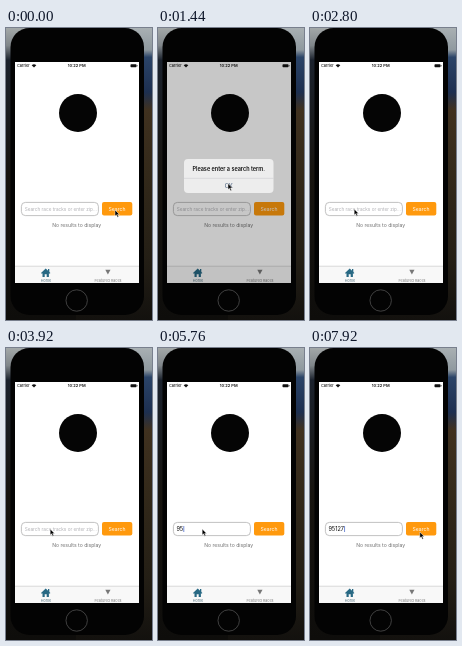
An HTML page for the animation above (8 s loop, 146 px wide and 292 px high).

```html
<!DOCTYPE html>
<html lang="en">
<head>
<meta charset="utf-8">
<title>Search screen</title>
<style>
  html, body { margin: 0; width: 100%; height: 100%; overflow: hidden; background: #080808; }
  svg { display: block; width: 100vw; height: 100vh; }
  text { font-family: Inter, Roboto, "Liberation Sans", sans-serif; }
  .mid { text-anchor: middle; }
  .small { font-size: 3.7px; }
  .body { font-size: 5.1px; }
</style>
</head>
<body>
<svg viewBox="0 0 146 292" preserveAspectRatio="none">
  <defs>
    <linearGradient id="hills" x2="0" y2="1">
      <stop offset="0" stop-color="#a9b0b3"/>
      <stop offset=".075" stop-color="#8f999f"/>
      <stop offset=".1" stop-color="#2b4468"/>
      <stop offset=".22" stop-color="#1d2f50"/>
      <stop offset=".28" stop-color="#40311f"/>
      <stop offset=".5" stop-color="#33291a"/>
      <stop offset=".8" stop-color="#231e15"/>
      <stop offset="1" stop-color="#13110e"/>
    </linearGradient>
    <linearGradient id="shade" x2="0" y2="1">
      <stop offset="0" stop-color="#a3a8a8"/>
      <stop offset=".06" stop-color="#80868a"/>
      <stop offset=".11" stop-color="#1b222d"/>
      <stop offset=".5" stop-color="#17140f"/>
      <stop offset="1" stop-color="#0e0d0b"/>
    </linearGradient>
    <clipPath id="screenClip"><rect x="9" y="34" width="124" height="221"/></clipPath>
  </defs>

  <rect width="146" height="292" fill="url(#shade)"/>
  <rect x="70" width="76" height="292" fill="url(#hills)"/>
  <rect x="4.5" y="0" width="133.5" height="287" rx="19" fill="#030303"/>
  <circle cx="70.7" cy="272.5" r="10.7" fill="none" stroke="#5a5a5a" stroke-width=".7"/>

  <g clip-path="url(#screenClip)">
    <rect x="9" y="34" width="124" height="221" fill="#fff"/>

    <g fill="#111">
      <text x="11" y="39.4" font-size="3.8" font-weight="500">Carrier</text>
      <path d="M25.7 37.2q2.3-2 4.6 0L28 39.6z"/>
      <text class="mid" x="70.7" y="39.4" font-size="4" font-weight="600">10:22 PM</text>
      <rect x="124.5" y="36.2" width="6" height="3" rx=".7"/>
      <rect x="130.8" y="37" width=".6" height="1.4"/>
    </g>

    <circle cx="72" cy="85" r="19" fill="#050505"/>

    <rect x="15.4" y="174.4" width="77" height="13.2" rx="4" fill="#fff" stroke="#a8a8a8" stroke-width=".7"/>
    <text id="hint" x="18.7" y="183" font-size="4.7" fill="#b0b0b4">Search race tracks or enter zip...</text>
    <text id="entry" x="18.4" y="183" font-size="5.6" fill="#050505"></text>
    <rect id="caret" y="178" width=".7" height="6" fill="#3c5ec8"/>

    <g id="button">
      <rect x="96" y="174" width="30.3" height="13.5" rx="2" fill="#ff990d"/>
      <text class="mid body" x="111" y="182.7" fill="#fff">Search</text>
    </g>
    <text class="mid body" x="70.7" y="199.2" fill="#707070">No results to display</text>

    <rect x="9" y="238" width="124" height="17" fill="#f8f8f8"/>
    <path d="M9 238.2h124" stroke="#b5b5b5" stroke-width=".5"/>
    <g fill="#286984">
      <path d="M35 245l4.7-4.4 4.7 4.4-.8.8-.7-.6v3.8h-2.2v-2.8h-2v2.8h-2.2v-3.8l-.7.6z"/>
      <path d="M42 241h1.3v3H42z"/>
    </g>
    <text class="mid small" x="40" y="254" fill="#587683">Home</text>
    <path d="M99.3 241.8h5.2l-2.6 4.8z" fill="#777"/>
    <text class="mid small" x="102" y="254" fill="#858585">Featured Races</text>

    <rect id="dim" x="9" y="34" width="124" height="221" fill="#000"/>
    <g id="alert">
      <rect x="26" y="131" width="89.5" height="34" rx="4" fill="#ededed"/>
      <path d="M26 150.3h89.5" stroke="#c5c5c8" stroke-width=".5"/>
      <text class="mid" x="70.7" y="142.6" font-size="5.5" font-weight="600" fill="#111">Please enter a search term.</text>
      <text class="mid" x="70.7" y="160.4" font-size="5.6" fill="#3f5878">OK</text>
    </g>
  </g>

  <path id="pointer" d="M0 0v6.1l1.4-1.3 1.1 2.4 1.1-.5-1.1-2.3h1.9z" fill="#000" stroke="#fff" stroke-width=".45"/>
</svg>
<script>
  const LOOP = 8000, STEP = 80, FOCUS = 3200;
  const [hint, entry, caret, button, dim, alertBox, pointer] =
    ['hint', 'entry', 'caret', 'button', 'dim', 'alert', 'pointer'].map(id => document.getElementById(id));

  const pointerX = [[1040, 109], [1440, 70], [1920, 70], [2800, 44.2], [7440, 44.2], [7840, 109.8]];
  const pointerY = [[1040, 182], [1440, 155.5], [1920, 155.5], [2800, 181], [7440, 181], [7840, 184]];
  const alertShown = [[320, 0], [480, .6], [560, .82], [800, 1], [1600, 1], [1920, 0]];
  const alertScale = [[320, 1.18], [560, 1.05], [800, 1]];
  const buttonShown = [[240, 1], [400, .35], [560, .45], [800, 1]];
  const typed = [[0, ''], [4880, '9'], [5760, '95'], [6240, '951'], [6720, '9512'], [7040, '95127']];

  // Eased value of a table of [time, value] keys.
  function track(keys, t) {
    const next = keys.findIndex(k => k[0] > t);
    if (next === 0) return keys[0][1];
    if (next < 0) return keys[keys.length - 1][1];
    const [t0, a] = keys[next - 1], [t1, b] = keys[next];
    const p = (t - t0) / (t1 - t0);
    return a + (b - a) * p * p * (3 - 2 * p);
  }

  // The caret restarts its blink whenever a digit is typed.
  function caretVisible(t, lastKey) {
    return t >= FOCUS && (t - Math.max(FOCUS, lastKey)) % 880 < 560;
  }

  function draw(now) {
    const t = Math.floor(now % LOOP / STEP) * STEP;
    const shown = track(alertShown, t), scale = track(alertScale, t);
    const [lastKey, value] = typed.filter(k => k[0] <= t).pop();

    pointer.setAttribute('transform', `translate(${track(pointerX, t)} ${track(pointerY, t)})`);
    dim.setAttribute('opacity', .22 * shown);
    alertBox.setAttribute('opacity', shown);
    alertBox.setAttribute('transform', `translate(70.7 148) scale(${scale}) translate(-70.7 -148)`);
    button.setAttribute('opacity', track(buttonShown, t));

    entry.textContent = value;
    hint.setAttribute('opacity', value ? 0 : 1);
    caret.setAttribute('x', 18.7 + (value ? entry.getComputedTextLength() : 0));
    caret.setAttribute('opacity', caretVisible(t, lastKey) ? 1 : 0);
  }

  const start = performance.now();
  function tick() {
    draw(performance.now() - start);
    requestAnimationFrame(tick);
  }
  tick();
</script>
</body>
</html>
```
